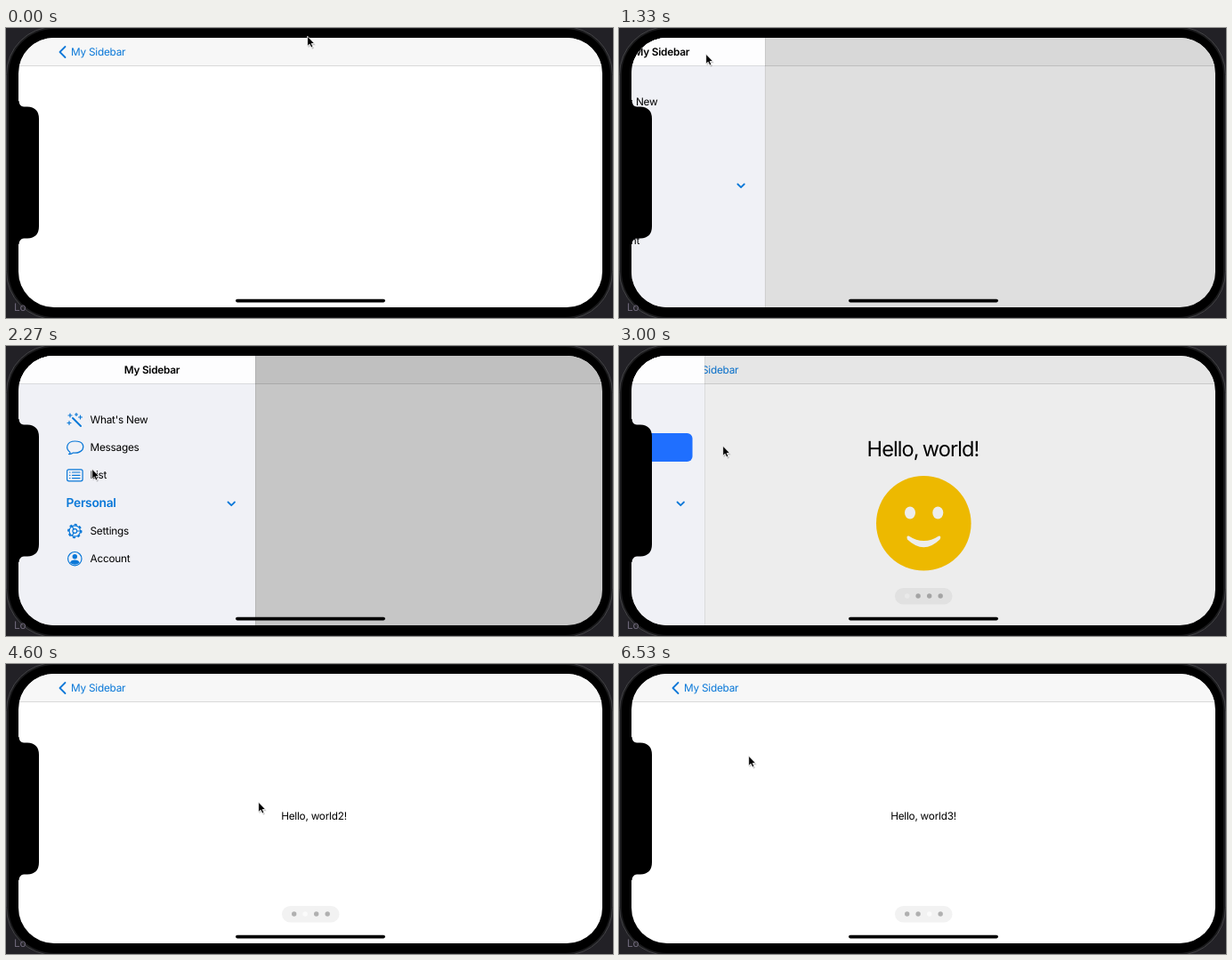
Recreate the animation shown at these times as an HTML page. Size 682 px wide and 326 px high, loop 6600 ms.

```html
<!DOCTYPE html>
<html lang="en">
<head>
<meta charset="utf-8">
<title>Sidebar demo</title>
<style>
  html, body { margin: 0; width: 100%; height: 100%; overflow: hidden; background: #222126; }
  svg { display: block; width: 682px; height: 326px; }
  text { font: 11.8px Inter, "Open Sans", sans-serif; letter-spacing: -.02em; text-rendering: geometricPrecision; }
  .middle { text-anchor: middle; }
  .bold { font-weight: 600; }
  .blue { fill: #0a78d8; }
  .large { font-size: 23.6px; letter-spacing: -.04em; word-spacing: -.06em; }
  .section { font-size: 13.8px; }
  .line { fill: none; stroke: #0a78d8; stroke-width: 1.2; stroke-linecap: round; stroke-linejoin: round; }
  .thick { stroke-width: 1.8; }
</style>
</head>
<body>
<svg viewBox="0 0 682 326">
  <defs>
    <clipPath id="screen"><rect x="14" y="11" width="656" height="303" rx="40"/></clipPath>
    <clipPath id="safe"><rect x="47" y="43" width="589" height="256"/></clipPath>
  </defs>

  <rect width="682" height="326" fill="#222126"/>
  <path d="M0 60h3" stroke="#111" stroke-width="2"/>
  <rect x=".5" y="-1.5" width="681" height="329" rx="54" fill="#1b1b1d" stroke="#444447"/>
  <rect x="3" y="1" width="676" height="324" rx="51"/>
  <text x="9" y="318" fill="#6f687a">Lo</text>

  <g clip-path="url(#screen)">
    <rect x="14" y="11" width="656" height="303" fill="#fff"/>
    <rect x="14" y="11" width="656" height="31" fill="#f7f7f7"/>
    <path d="M14 42.5h656" stroke="#d9d9d9"/>
    <path class="line thick" d="M66.5 21l-6 6 6 6"/>
    <text class="blue" x="73" y="31.2">My Sidebar</text>

    <g id="content">
      <g clip-path="url(#safe)">
        <g id="pages">
          <text class="middle large" x="341.5" y="123.6">Hello, world!</text>
          <circle cx="342.3" cy="199.3" r="53.3" fill="#ffc700"/>
          <g fill="#fff">
            <ellipse cx="327" cy="187.5" rx="6" ry="7"/>
            <ellipse cx="358.3" cy="187.5" rx="6" ry="7"/>
            <path d="M325.5 213.5Q342.500 224.500 359.500 213.500Q362.500 213.500 360.500 217.500Q342.500 235 324 217.500Q322.500 213 325.500 213.500"/>
          </g>
          <text class="middle" x="933" y="175.2">Hello, world2!</text>
          <text class="middle" x="1520" y="175.2">Hello, world3!</text>
        </g>
      </g>
      <rect x="310" y="272" width="64.5" height="18.5" rx="9.25" fill="#f2f2f2"/>
      <g id="dots"></g>
    </g>

    <rect id="dim" x="14" y="11" width="656" height="303"/>

    <g id="sidebar">
      <path d="M280.5 11v303" stroke="#000" opacity=".08"/>
      <rect x="14" y="11" width="266" height="303" fill="#f0f1f6"/>
      <rect x="14" y="11" width="266" height="31" fill="#fdfdfe"/>
      <path d="M14 42.5h266" stroke="#d9dadd"/>
      <text class="middle bold" x="164" y="31.2">My Sidebar</text>
      <rect id="selection" x="58" y="98" width="208.500" height="32" rx="6" fill="#1f6fff"/>
      <g id="rows"></g>
      <text class="section bold blue" x="67.5" y="181.3">Personal</text>
      <path class="line thick" d="M249.5 175.5l3.7 3.7 3.7-3.7"/>

      <g class="line">
        <path d="M75 81l9 9" stroke-width="2"/>
        <path d="M72 76v4M70 78h4M79 75.5v3M77.5 77h3M83.5 78v4M81.5 80h4M71 84.5v4M69 86.5h4"/>
        <path id="bubble" d="M72 119.5C66 115 68.5 107 77.5 107S88 112 86 116.5Q82 121 75.5 120Q73 122 70.5 121.5Q72.5 120.5 72 119.5Z"/>
        <rect x="68.6" y="138.8" width="17.5" height="13" rx="2"/>
        <path d="M71.5 142h.5M74.5 142h8.5M71.5 145.3h.5M74.5 145.3h8.5M71.5 148.6h.5M74.5 148.6h8.5"/>
        <circle cx="77.3" cy="208" r="6.2"/>
        <circle cx="77.3" cy="208" r="7.3" stroke-width="1.8" stroke-dasharray="1.6 4.13"/>
        <circle cx="77.3" cy="208" r="2.4"/>
        <path d="M79.7 208h3.8M76.1 205.9l-1.9-3.3M76.1 210.1l-1.9 3.3"/>
        <circle cx="77.3" cy="239.2" r="7.7"/>
      </g>
      <g class="blue">
        <circle cx="77.3" cy="236.8" r="2.7"/>
        <path d="M72 243.8q.8-3.3 5.300-3.300t5.300 3.300q-5.300 4-10.600 0"/>
      </g>
    </g>

    <path d="M13 82h1.5Q15 88 20 88.5H24Q37 89 37 102V223Q37 236 24 236.5H20Q15 237 14.5 243H13Z"/>
    <rect x="258" y="304.8" width="168" height="3.6" rx="1.8"/>
  </g>

  <g id="cursor">
    <path d="M1 1.5v11.5l2.5-2.2 1.8 3.8 2-1-1.7-3.5h3.5z" opacity=".2"/>
    <path d="M0 0v11.2l2.5-2.2 1.7 3.8 2-.9-1.7-3.6h3.5z" stroke="#fff" stroke-width=".8"/>
  </g>
</svg>

<script>
const LOOP = 6600, OPEN = 1205, SELECT = 2841, SWIPES = [4200, 5460];
const SIDEBAR_WIDTH = 266, PAGE_WIDTH = 589;

// Each key is [time, ...values].
const CURSOR = [
  [0, 338, 9], [70, 338, 9], [270, 284, -16], [460, 132, -16], [600, 120, 8],
  [870, 97, 29], [2000, 97, 29], [2270, 96, 138], [2400, 100, 141],
  [2670, 116, 112], [3400, 116, 112], [3530, 182, 113], [3900, 499, 160],
  [4070, 455, 157], [4150, 455, 157], [4290, 283, 155], [4670, 283, 155],
  [5150, 460, 150], [5400, 455, 150], [5530, 270, 152], [5700, 262, 150],
  [6330, 149, 104], [6530, 145, 103]
];
const SWIPE = [[0, 0], [70, .33], [130, .63], [200, .83], [270, .94], [330, .98], [400, .9966], [450, 1]];

const byId = id => document.getElementById(id);

function add(parent, tag, attributes, label = "") {
  const node = document.createElementNS("http://www.w3.org/2000/svg", tag);
  for (const name in attributes) node.setAttribute(name, attributes[name]);
  node.textContent = label;
  return byId(parent).appendChild(node);
}

function along(keys, t) {
  if (t <= keys[0][0]) return keys[0].slice(1);
  const next = keys.findIndex(key => key[0] > t);
  if (next < 0) return keys.at(-1).slice(1);
  const [a, b] = [keys[next - 1], keys[next]];
  const k = (t - a[0]) / (b[0] - a[0]);
  return a.slice(1).map((value, i) => value + (b[i + 1] - value) * k);
}

// Critically damped spring from 0 to 1.
function spring(ms) {
  const x = Math.max(0, ms) * .015;
  return 1 - (1 + x) * Math.exp(-x);
}

const rows = [["What's New", 83], ["Messages", 114], ["List", 145], ["Settings", 208], ["Account", 239]]
  .map(([label, y]) => add("rows", "text", { x: 94.5, y: y + 4.2 }, label));
const dots = [323.7, 336.1, 348.7, 361.2].map(cx => add("dots", "circle", { cx, cy: 281, r: 2.7 }));

const move = (id, x, y = 0) => byId(id).setAttribute("transform", `translate(${x} ${y})`);

function draw(t) {
  const selected = t >= SELECT;
  const shown = spring(t - OPEN) - spring(t - SELECT);
  move("sidebar", (shown - 1) * SIDEBAR_WIDTH);
  byId("sidebar").style.display = shown > .001 ? "" : "none";
  byId("dim").style.opacity = shown * .225;
  byId("selection").style.display = selected ? "" : "none";
  byId("content").style.display = selected ? "" : "none";
  rows[1].style.fill = byId("bubble").style.stroke = selected ? "#fff" : "";

  const page = SWIPES.reduce((sum, start) => sum + along(SWIPE, t - start)[0], 0);
  move("pages", -page * PAGE_WIDTH);
  dots.forEach((dot, i) => dot.setAttribute("fill", i === Math.round(page) ? "#fbfbfb" : "#b0b0b0"));

  const [x, y] = along(CURSOR, t);
  move("cursor", x + .7, y + .2);
}

function tick() {
  draw(performance.now() % LOOP);
  requestAnimationFrame(tick);
}
tick();
</script>
</body>
</html>
```
